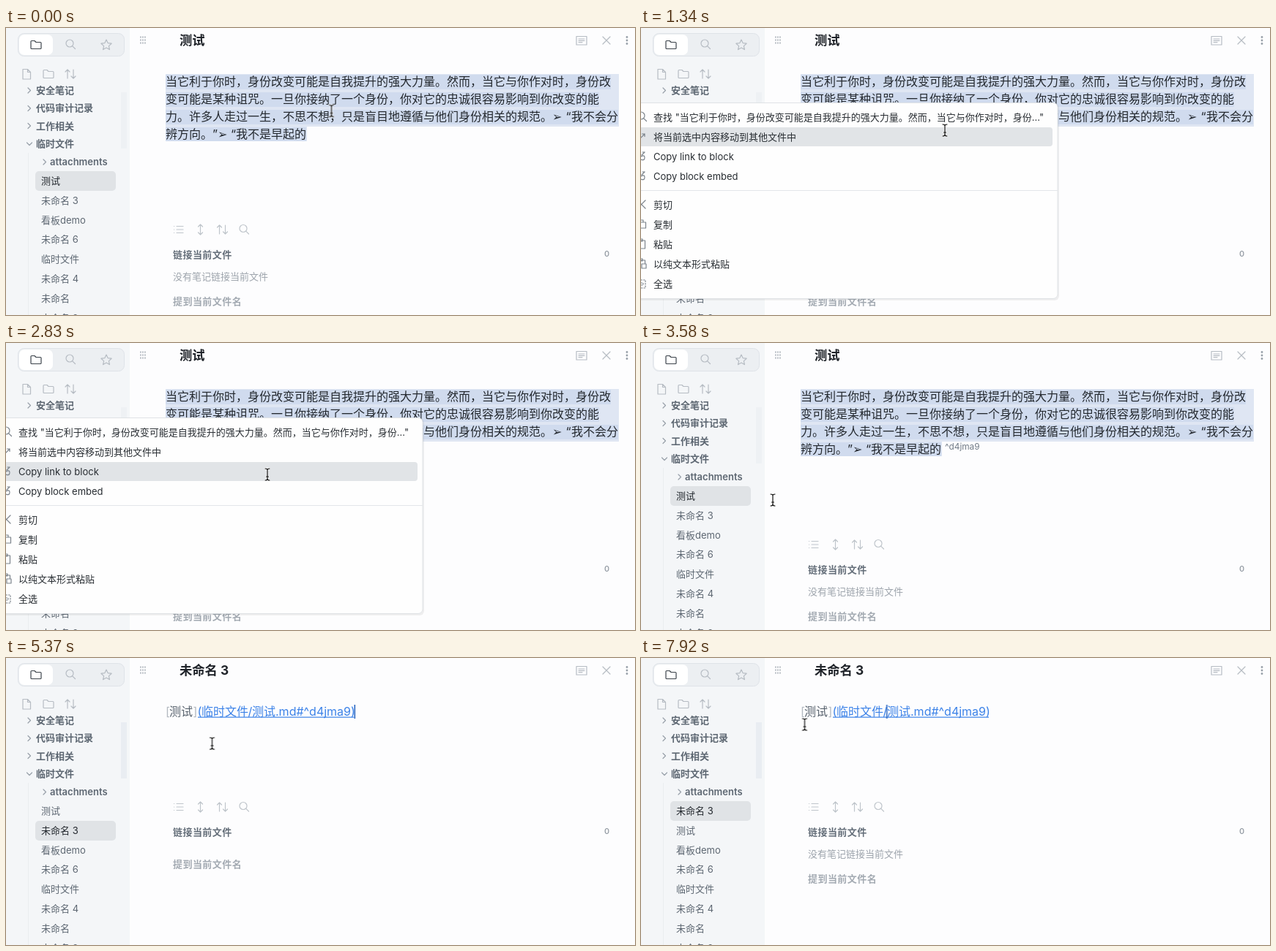
An HTML page that plays this animation: 859x393 px, repeating every 8000 ms.

```html
<!DOCTYPE html>
<html lang="zh-CN">
<head>
<meta charset="utf-8">
<title>块链接</title>
<style>
html, body { margin: 0; width: 100%; height: 100%; overflow: hidden; background: #fdfdfe; }
svg { display: block; width: 859px; height: 393px; font: 13px Inter, 'Noto Sans CJK SC', sans-serif; }
svg * { animation: 8s step-end -5ms infinite; }
text { white-space: pre; }

.line { fill: none; stroke: #b6bcc3; stroke-width: 1.2; stroke-linecap: round; stroke-linejoin: round; }
.dim { stroke: #bfc5cb; }
.dark { stroke: #7b838b; }
.folders { font-weight: 600; fill: #5d6772; }
.files { fill: #5d6772; }
.body { font-size: 16px; fill: #23282e; }
.title { font-size: 17.3px; font-weight: 700; fill: #1f2329; }
.head { font-weight: 600; letter-spacing: .45px; }
.arrow { font-family: 'DejaVu Sans', sans-serif; }
.tip { fill: #f5f5f6; text-anchor: middle; }

/* document switch and the things on it */
#old { animation-name: old; }
@keyframes old { 0% { opacity: 1 } 54.125% { opacity: 0 } }
#new { animation-name: new; }
@keyframes new { 0% { opacity: 0 } 54.125% { opacity: 1 } }
#block { animation-name: block; }
@keyframes block { 0% { opacity: 0 } 37.25% { opacity: 1 } }
#link { animation-name: link; }
@keyframes link { 0% { opacity: 0 } 67.125% { opacity: 1 } }
#menu { animation-name: menu; }
@keyframes menu { 0%, 37.25% { opacity: 0 } 13% { opacity: 1 } }
#tooltip { animation-name: tooltip; }
@keyframes tooltip { 0%, 54.125% { opacity: 0 } 50.375% { opacity: 1 } }
#scroll { animation-name: scroll; }
@keyframes scroll { 0% { opacity: .5 } 46.625% { opacity: 1 } }

/* sidebar */
#active { animation-name: active; }
@keyframes active { 0%, 91.5% { transform: none } 54.125% { transform: translateY(27px) } }
#test { animation-name: test; }
@keyframes test {
  0% { transform: none; fill: #23282e }
  54.125% { transform: none; fill: #5d6772 }
  91.5% { transform: translateY(27px); fill: #5d6772 }
}
#three { animation-name: three; }
@keyframes three {
  0% { transform: none; fill: #5d6772 }
  48.5% { transform: none; fill: #23282e }
  91.5% { transform: translateY(-27px); fill: #23282e }
}

/* backlinks */
#panel { animation-name: panel; }
@keyframes panel { 0% { transform: none } 54.125% { transform: translateY(-72px) } }
#none { animation-name: none-found; }
@keyframes none-found { 0%, 91.5% { opacity: 1 } 54.125% { opacity: 0 } }
#mention { animation-name: mention; }
@keyframes mention { 0%, 91.5% { transform: none } 54.125% { transform: translateY(-20px) } }

#hover { animation-name: hover; }
@keyframes hover {
  0%, 13%, 26% { transform: translateY(-60px) }
  14.875% { transform: translateY(109px) }
  16.75% { transform: translateY(136px) }
  18.5%, 31.625% { transform: translateY(163px) }
  20.375%, 27.875% { transform: translateY(190px) }
  24.125% { transform: translateY(229px) }
}

#caret { animation-name: caret; }
@keyframes caret {
  0%, 14.875%, 29.75%, 44.75% { opacity: 0; transform: translateX(218px) }
  7.375%, 22.25%, 37.25%, 52.25% { opacity: 1; transform: translateX(218px) }
  61.5% { opacity: 0; transform: translateX(218px) }
  67.125%, 82.125% { opacity: 1; transform: translateX(476px) }
  74.625% { opacity: 0; transform: translateX(476px) }
  87.75% { opacity: 1; transform: translateX(470px) }
  95.25% { opacity: 1; transform: translateX(413px) }
  97.125% { opacity: 1; transform: translateX(373px) }
  99% { opacity: 1; transform: translateX(335.5px) }
}

/* pointer */
#mouse { animation-name: mouse; }
@keyframes mouse {
  0% { transform: translate(444.5px, 113.5px) }
  1.75% { transform: translate(441px, 111px) }
  3.625% { transform: translate(435px, 107px) }
  5.5% { transform: translate(429px, 103px) }
  7.375% { transform: translate(425.5px, 101px) }
  14.875% { transform: translate(424px, 112px) }
  16.75% { transform: translate(415px, 140px) }
  18.5% { transform: translate(392px, 170px) }
  20.375% { transform: translate(358px, 200px) }
  22.25% { transform: translate(322px, 221px) }
  24.125% { transform: translate(303px, 228px) }
  26% { transform: translate(312px, 230px) }
  27.875% { transform: translate(332px, 213px) }
  29.75% { transform: translate(350px, 192px) }
  31.625% { transform: translate(357px, 180px) }
  41% { transform: translate(330px, 184px) }
  42.875% { transform: translate(262px, 196px) }
  44.75% { transform: translate(180px, 215px) }
  46.625% { transform: translate(115px, 236px) }
  48.5% { transform: translate(82px, 241px) }
  50.375% { transform: translate(75px, 239px) }
  52.25% { transform: translate(74px, 237px) }
  57.875% { transform: translate(120px, 210px) }
  59.625% { transform: translate(230px, 150px) }
  61.5% { transform: translate(281.5px, 117px) }
  72.75% { transform: translate(340px, 112px) }
  74.625% { transform: translate(470px, 104px) }
  76.5% { transform: translate(526px, 96px) }
  78.375% { transform: translate(420px, 92px) }
  80.25% { transform: translate(280px, 92px) }
  82.125% { transform: translate(223.5px, 91px) }
}
#pointer { animation-name: pointer; }
@keyframes pointer { 0%, 29.75%, 59.625% { opacity: 0 } 20.375%, 46.625% { opacity: 1 } }
#beam { animation-name: beam; }
@keyframes beam { 0%, 29.75%, 59.625% { opacity: 1 } 20.375%, 46.625% { opacity: 0 } }
</style>
</head>
<body>
<svg viewBox="0 0 859 393">
  <defs>
    <g id="find"><circle cx="-1" cy="-1" r="5"/><path d="M2.8 2.8 6.5 6.5"/></g>
    <path id="folder" d="M-7-4.5a1 1 0 0 1 1-1h4l2 2h6a1 1 0 0 1 1 1v7a1 1 0 0 1-1 1h-12a1 1 0 0 1-1-1z"/>
    <path id="sort" d="M-4 6V-6M-7-3l3-3 3 3M4-6V6M1 3l3 3 3-3"/>
    <path id="chev" d="M-2-3.5 1.5 0-2 3.5"/>
    <path id="stem" d="M-3-8q3 0 3 2V6q0 2-3 2M3-8q-3 0-3 2V6q0 2 3 2M-1.5 3h3"/>
  </defs>
  <rect width="859" height="393" fill="#fdfdfe"/>

  <g id="sidebar">
    <rect width="169" height="393" fill="#f4f6f8"/>
    <rect x="16.5" y="7.5" width="145" height="31" rx="8" fill="#eceff2" stroke="#dfe3e8"/>
    <rect x="18" y="9" width="46" height="28" rx="7" fill="#fff"/>
    <g class="line">
      <use href="#folder" x="41" y="23" stroke="#3c434b"/>
      <use href="#find" x="88" y="22"/>
      <path d="m137 16 2.1 4.6 5 .6-3.7 3.4 1 5-4.4-2.5-4.4 2.5 1-5-3.7-3.4 5-.6z"/>
      <path d="M23 56.5h6.5l4 4v9.5h-10.5zM29.5 56.5v4h4"/>
      <use href="#folder" x="58" y="63"/>
      <use href="#sort" x="88" y="63"/>
      <g stroke="#98a0a9">
        <use href="#chev" x="32" y="85.5"/><use href="#chev" x="32" y="110"/>
        <use href="#chev" x="32" y="134"/><use href="#chev" x="53" y="183.5"/>
        <path d="m28.5 157 3.5 3.5 3.5-3.5"/>
      </g>
    </g>
    <path d="M30.5 171V393" stroke="#eaedf0"/>
    <g class="folders">
      <text x="41" y="90">安全笔记</text>
      <text x="41" y="114">代码审计记录</text>
      <text x="41" y="138.5">工作相关</text>
      <text x="41" y="163">临时文件</text>
      <text x="60" y="188">attachments</text>
    </g>
    <rect id="active" x="40" y="196" width="110" height="27" rx="5" fill="#e0e3e6"/>
    <g class="files">
      <text id="test" x="48" y="214">测试</text>
      <text id="three" x="48" y="241">未命名 3</text>
      <text x="48" y="268">看板demo</text>
      <text x="48" y="294">未命名 6</text>
      <text x="48" y="321">临时文件</text>
      <text x="48" y="348">未命名 4</text>
      <text x="48" y="374.5">未命名</text>
      <text x="48" y="401.5">未命名 2</text>
    </g>
    <rect id="scroll" x="157" y="88" width="8" height="77" fill="#e9edf2"/>
  </g>

  <path d="M183 12.5h8M183 16.5h8M183 20.5h8" stroke="#b2b8bf" stroke-width="1.8" stroke-dasharray="1.8 1.2"/>
  <path class="line" d="M779 11.5h14v11.5h-14zM782 15h8M782 17.3h8M782 19.6h5M815 12l10 10M825 12l-10 10"/>
  <g fill="#98a0a9"><circle cx="848" cy="12.5" r="1.4"/><circle cx="848" cy="17" r="1.4"/><circle cx="848" cy="21.5" r="1.4"/></g>

  <g id="old">
    <text class="title" x="237" y="23">测试</text>
    <path d="M218 63H837V135H411V155H218z" fill="#dfe6f3"/>
    <path d="M218 64h608v20H218zM218 88h592v20H218zM218 112h618v20H218zM218 136h192v19H218z" fill="#d0dbee"/>
    <g class="body">
      <text x="218" y="79">当它利于你时，身份改变可能是自我提升的强大力量。然而，当它与你作对时，身份改</text>
      <text x="218" y="103">变可能是某种诅咒。一旦你接纳了一个身份，你对它的忠诚很容易影响到你改变的能</text>
      <text y="127"><tspan x="218">力。许多人走过一生，不思不想，只是盲目地遵循与他们身份相关的规范。</tspan><tspan class="arrow" x="746">➢</tspan><tspan x="764.5">“</tspan><tspan x="772">我不会分</tspan></text>
      <text y="151"><tspan x="218">辨方向。</tspan><tspan x="282">”</tspan><tspan class="arrow" x="289">➢</tspan><tspan x="307">“</tspan><tspan x="314">我不是早起的</tspan></text>
    </g>
    <text id="block" x="415" y="146" font-size="11.8" fill="#717b87">^d4jma9</text>
  </g>

  <g id="new">
    <text class="title" x="237" y="23">未命名 3</text>
    <g id="link" class="body">
      <text y="79" fill="#b3b9c0"><tspan x="218">[</tspan><tspan x="223" fill="#59636e">测试</tspan><tspan x="255.5">]</tspan></text>
      <text y="79" fill="#3b82e8"><tspan x="261.5">(</tspan><tspan x="267">临时文件</tspan><tspan x="330.5">/</tspan><tspan x="336">测试</tspan><tspan x="368">.md#^d4jma9)</tspan></text>
      <rect x="262" y="80.5" width="213" height="1.2" fill="#3b82e8"/>
    </g>
  </g>
  <rect id="caret" x="-.5" y="64" width="1.6" height="19" fill="#2a66c0"/>

  <g id="panel">
    <g class="line dim">
      <path d="M233 271.500h9M233 276h9M233 280.500h9M229.500 271.500h.1M229.500 276h.1M229.500 280.500h.1"/>
      <path d="M265.500 269v14M262.500 272l3-3 3 3M262.500 280l3 3 3-3"/>
      <use href="#sort" x="295.5" y="276"/>
      <use href="#find" x="325" y="275.5"/>
    </g>
    <text class="head" x="228" y="315" fill="#646e79">链接当前文件</text>
    <text x="817" y="313" font-size="11" font-weight="500" fill="#8d959e">0</text>
    <text id="none" x="228" y="344.5" fill="#9da4ac">没有笔记链接当前文件</text>
    <text id="mention" class="head" x="228" y="379" fill="#a3aab2">提到当前文件名</text>
  </g>

  <g id="menu">
    <rect x="-8" y="103" width="579" height="270" rx="6" fill="#000" opacity=".06"/>
    <rect x="-8" y="102.5" width="577" height="268" rx="6" fill="#fefefe" stroke="#dfe2e5"/>
    <path d="M0 222.5H569" stroke="#e3e6e9"/>
    <rect id="hover" x="-8" width="570" height="26" rx="4" fill="#e1e4e7"/>
    <g class="line dark">
      <use href="#find" x="1" y="121"/>
      <path d="M0 150 5 145M1.5 145H5v3.5"/>
      <path id="chain" d="M0 180q5 2 5-2.5t-5-1.5M1 174l4-4M2 170h3"/>
      <use href="#chain" y="27"/>
      <path d="M0 242 6 236M0 241l6 6"/>
      <path d="M0 266h6.5v8H0M0 263h3v3"/>
      <path d="M0 291h5.5v11H0M0 289h2v3H0"/>
      <path d="M0 318h5.5v4M1 323h6v6H1zM0 316h2v3H0"/>
      <path d="M0 345h6v11H0M0 349h3v3H0" stroke-dasharray="1.5 2"/>
    </g>
    <g fill="#282d32">
      <text x="17" y="127">查找 "当它利于你时，身份改变可能是自我提升的强大力量。然而，当它与你作对时，身份..."</text>
      <text x="17" y="154">将当前选中内容移动到其他文件中</text>
      <text x="17" y="181">Copy link to block</text>
      <text x="17" y="208">Copy block embed</text>
      <text x="17" y="247">剪切</text>
      <text x="17" y="274">复制</text>
      <text x="17" y="301">粘贴</text>
      <text x="17" y="328">以纯文本形式粘贴</text>
      <text x="17" y="355">全选</text>
    </g>
  </g>

  <g id="tooltip" fill="#161718">
    <rect x="190.5" y="216.5" width="199.5" height="39.5" rx="4.5"/>
    <path d="M186.5 236.5 192 231.5v10z"/>
    <text class="tip" x="290" y="233.5">最后修改于 2022-05-08 16:20</text>
    <text class="tip" x="290" y="249">创建于 2022-05-07 20:36</text>
  </g>

  <g id="mouse">
    <g id="beam" fill="none" stroke-linecap="round">
      <use href="#stem" stroke="#fff" stroke-width="2.6" opacity=".8"/>
      <use href="#stem" stroke="#111" stroke-width="1.2"/>
    </g>
    <path id="pointer" d="M0 0V14.5L3.3 11.4 5.7 17 8.3 15.9 5.9 10.4H10.5z" fill="#111" stroke="#fff" stroke-width="1.2"/>
  </g>
</svg>
</body>
</html>
```
